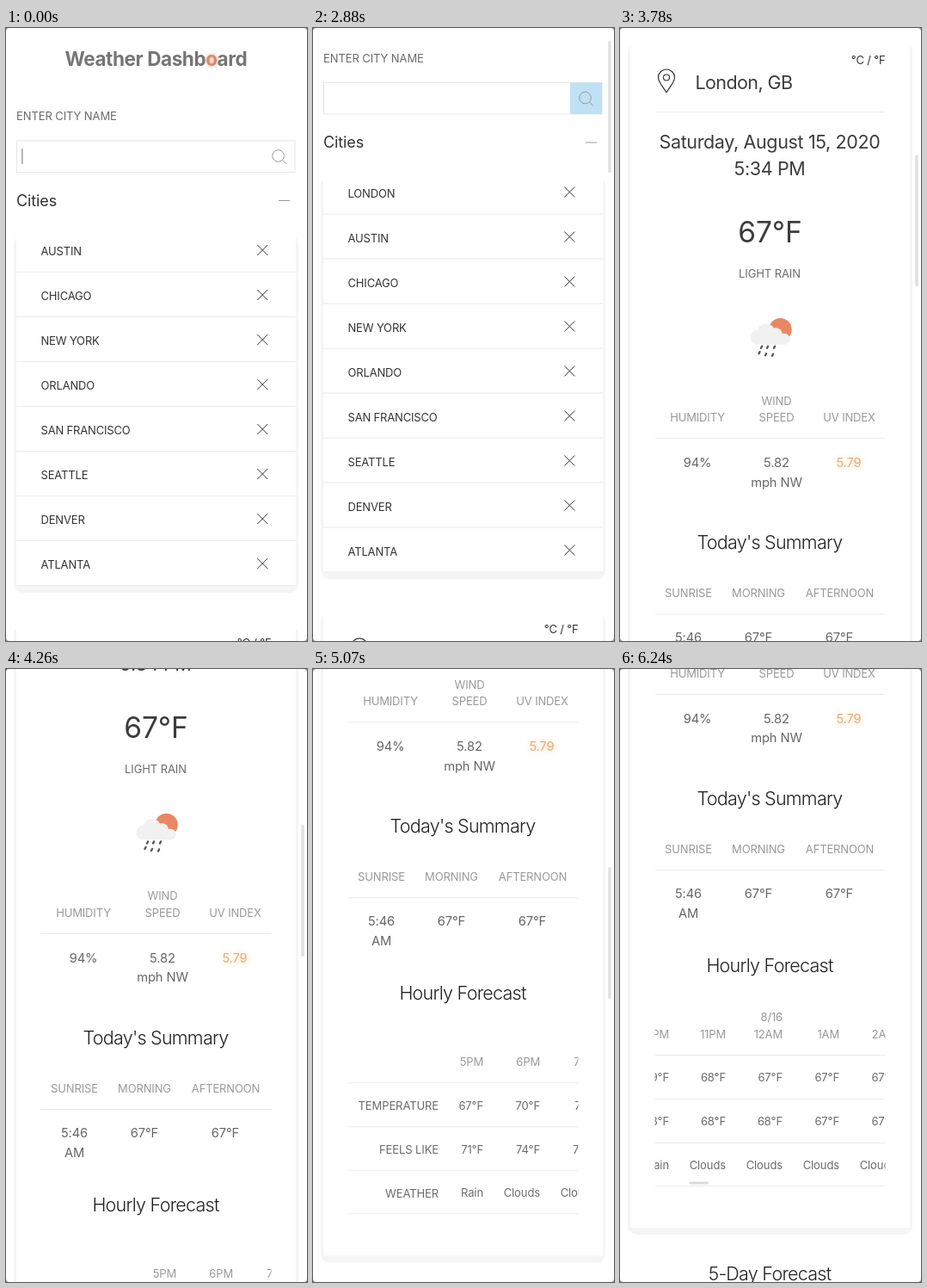
These frames come from a looping animation (350 px wide and 712 px high, 6270 ms). An HTML page with a canvas:

```html
<!DOCTYPE html>
<html lang="en">
<head>
<meta charset="utf-8">
<title>Weather Dashboard</title>
<style>
html, body { margin: 0; width: 100%; height: 100%; overflow: hidden; background: #fff; }
canvas { display: block; width: 350px; height: 712px; }
</style>
</head>
<body>
<canvas id="stage"></canvas>
<script>
const W = 350, H = 712, LOOP = 6270, STEP = 30, ROW = 52;
const canvas = document.getElementById('stage');
const ctx = canvas.getContext('2d');
const dpr = window.devicePixelRatio || 1;
canvas.width = W * dpr;
canvas.height = H * dpr;

const CITIES = ['AUSTIN', 'CHICAGO', 'NEW YORK', 'ORLANDO', 'SAN FRANCISCO', 'SEATTLE', 'DENVER', 'ATLANTA'];
const KEY_TIMES = [480, 600, 780, 960, 1080, 1200];
const SUBMIT = 2700, ADDED = 2730;

// [hour, temperature, feels like, weather]
const HOURS = [
  ['5PM', 67, 71, 'Rain'], ['6PM', 70, 74, 'Clouds'], ['7PM', 71, 74, 'Clouds'],
  ['8PM', 70, 72, 'Clouds'], ['9PM', 70, 70, 'Clouds'], ['10PM', 69, 68, 'Rain'],
  ['11PM', 68, 68, 'Clouds'], ['12AM', 67, 68, 'Clouds', '8/16'],
  ['1AM', 67, 67, 'Clouds'], ['2AM', 67, 67, 'Clouds']
];

const smooth = p => p * p * (3 - 2 * p);
const easeOut = k => p => 1 - Math.pow(1 - p, k);

// [start, end, from, to, easing]
const FLICKS = [
  [2760, 3240, 0, 432, smooth],
  [3570, 4200, 432, 872, easeOut(2.76)],
  [4200, 4740, 872, 999.5, easeOut(1.9)],
  [4830, 5250, 999.5, 1175.5, easeOut(2)]
];
const SWIPES = [[5730, 6240, 0, 457, easeOut(2)]];

function position(moves, t) {
  let value = 0;
  for (const [start, end, from, to, ease] of moves) {
    if (t >= start) value = from + (to - from) * ease(Math.min(1, (t - start) / (end - start)));
  }
  return value;
}

// [weight, size, letter spacing, colour]
const STYLE = {
  title: [700, 22.5, -0.42, '#757575'],
  label: [400, 13, -0.1, '#6b6b6b'],
  city: [400, 13, -0.17, '#333'],
  head: [400, 13, -0.15, '#999'],
  value: [400, 14.7, -0.1, '#666'],
  section: [400, 18, -0.1, '#333'],
  place: [400, 21.5, -0.6, '#3c3c3c'],
  date: [400, 21.5, -0.36, '#3c3c3c'],
  heading: [300, 21.5, -0.74, '#222'],
  temp: [400, 33.5, -0.1, '#3c3c3c']
};

function setStyle(name) {
  const [weight, size, spacing, color] = STYLE[name];
  ctx.font = `${weight} ${size}px Inter, "Open Sans", sans-serif`;
  ctx.letterSpacing = spacing + 'px';
  ctx.fillStyle = color;
  return size;
}

// y is the middle of the capitals
function text(str, x, y, style, align = 'center', color) {
  const size = setStyle(style);
  if (color) ctx.fillStyle = color;
  ctx.textAlign = align;
  ctx.fillText(str, x, y + size * 0.364);
}

function rect(x, y, w, h, color, radius = 0) {
  ctx.fillStyle = color;
  ctx.beginPath();
  ctx.roundRect(x, y, w, h, radius);
  ctx.fill();
}

function stroke(color, width, draw) {
  ctx.strokeStyle = color;
  ctx.lineWidth = width;
  ctx.beginPath();
  draw();
  ctx.stroke();
}

function rule(y, x1 = 41, x2 = 308, color = '#eaeaea') {
  rect(x1, Math.floor(y), x2 - x1, 1, color);
}

function circle(x, y, r, color) {
  ctx.fillStyle = color;
  ctx.beginPath();
  ctx.arc(x, y, r, 0, Math.PI * 2);
  ctx.fill();
}

function card(top, bottom) {
  rect(9, top + 4, 331, bottom - top + 4, '#f5f5f5', 10);
  rect(12, top, 325, bottom - top, '#fff');
}

function title() {
  const parts = ['Weather Dashb', 'o', 'ard'];
  setStyle('title');
  const widths = parts.map(p => ctx.measureText(p).width);
  let x = 174.3 - widths.reduce((a, b) => a + b) / 2;
  parts.forEach((part, i) => {
    ctx.save();
    if (i === 1) {
      ctx.shadowColor = '#f0a080';
      ctx.shadowBlur = 4 * dpr;
    }
    text(part, x, 36.3, 'title', 'left', i === 1 ? '#d58c70' : undefined);
    ctx.restore();
    x += widths[i];
  });
}

function searchField(t) {
  ctx.strokeStyle = '#e6e6e6';
  ctx.lineWidth = 1;
  ctx.strokeRect(12.5, 131, 323.5, 36.5);
  if (t >= SUBMIT) rect(299, 131, 37, 36.5, '#bfe1f4');
  stroke('#999', 1, () => {
    ctx.arc(316.5, 148.5, 6.8, 0, Math.PI * 2);
    ctx.moveTo(321.4, 153.4);
    ctx.lineTo(326, 158);
  });
  if (t >= SUBMIT) return;

  const typed = 'London'.slice(0, KEY_TIMES.filter(k => t >= k).length);
  text(typed, 18.5, 149, 'city', 'left');
  const caretOff = (t >= 180 && t < KEY_TIMES[0]) || (t >= 1650 && t < 2100) || t >= 2550;
  if (!caretOff) rect(18.3 + ctx.measureText(typed).width, 140, 1.2, 18, '#888');
}

function cityList(names) {
  const bottom = 283 + ROW * (names.length - 1);
  card(237, bottom + 1);
  names.forEach((name, i) => {
    const y = 259.4 + ROW * i;
    text(name, 40.5, y, 'city', 'left');
    stroke('#333', 1, () => {
      for (const d of [-6, 6]) {
        ctx.moveTo(298.3 - d, y - 7.4);
        ctx.lineTo(298.3 + d, y + 4.6);
      }
    });
    rule(283 + ROW * i, 12, 337);
  });
}

function pin(x, y) {
  stroke('#333', 1.2, () => {
    ctx.moveTo(x, y + 27);
    ctx.bezierCurveTo(x - 4, y + 20, x - 9.5, y + 15, x - 9.5, y + 9.5);
    ctx.arc(x, y + 9.5, 9.5, Math.PI, 0);
    ctx.bezierCurveTo(x + 9.5, y + 15, x + 4, y + 20, x, y + 27);
    ctx.moveTo(x + 3.5, y + 9.5);
    ctx.arc(x, y + 9.5, 3.5, 0, Math.PI * 2);
  });
}

function rainIcon(x, y) {
  circle(x + 35.5, y + 14, 13.2, '#ea8763');
  const cloud = '#f1f1f1';
  circle(x + 19, y + 17, 10, cloud);
  circle(x + 30, y + 20, 8, cloud);
  circle(x + 9, y + 23, 8.5, cloud);
  circle(x + 40, y + 25, 6.5, cloud);
  rect(x + 8, y + 20, 33, 11.5, cloud, 5);
  ctx.lineCap = 'round';
  stroke('#555', 2.4, () => {
    for (const [dx, dy] of [[14, 33.5], [21, 33.5], [29, 33.5], [11.5, 40], [19, 42], [27, 42.5]]) {
      ctx.moveTo(x + dx, y + dy);
      ctx.lineTo(x + dx - 1, y + dy + 2);
    }
  });
  ctx.lineCap = 'butt';
}

function hourly(shift) {
  ctx.save();
  ctx.beginPath();
  ctx.rect(40.5, 835, 268, 220);
  ctx.clip();
  ['TEMPERATURE', 'FEELS LIKE', 'WEATHER'].forEach((name, i) => {
    text(name, 146 - shift, 922.5 + 51 * i, 'label', 'right');
  });
  let right = 146 - shift;
  for (const [hour, temp, feels, sky, date] of HOURS) {
    right += sky === 'Rain' ? 52 : 66;
    text(hour, right, 872, 'head', 'right');
    if (date) text(date, right, 852, 'head', 'right');
    text(temp + '°F', right, 922.5, 'label', 'right');
    text(feels + '°F', right, 973.5, 'label', 'right');
    text(sky, right, 1024, 'label', 'right');
  }
  ctx.restore();
  [896.5, 947.5, 998, 1048.5].forEach(y => rule(y));
  if (shift > 0) rect(41 + shift * 0.0865, 1043.5, 22.5, 3, '#dcdcdc', 1.5);
}

function weather(shift) {
  card(15, 1097);
  text('°C / °F', 308.5, 38.3, 'city', 'right');
  pin(54, 48.8);
  text('London, GB', 87.5, 64, 'place', 'left');
  rule(98);
  text('Saturday, August 15, 2020', 174, 133.3, 'date');
  text('5:34 PM', 174, 164.3, 'date');
  text('67°F', 174.5, 237.8, 'temp');
  text('LIGHT RAIN', 174, 286.5, 'label');
  rainIcon(151, 337);

  text('HUMIDITY', 90, 453.4, 'head');
  text('WIND', 182, 433.8, 'head');
  text('SPEED', 182, 453.4, 'head');
  text('UV INDEX', 266.5, 453.4, 'head');
  rule(477.5);
  text('94%', 90, 505.3, 'value');
  text('5.82', 182, 505.3, 'value');
  text('mph NW', 182, 528, 'value');
  ctx.save();
  ctx.shadowColor = '#f5c890';
  ctx.shadowBlur = 7 * dpr;
  text('5.79', 266, 505.3, 'value', 'center', '#e2b07c');
  ctx.restore();

  text("Today's Summary", 174, 598, 'heading');
  text('SUNRISE', 79.5, 657.4, 'head');
  text('MORNING', 161, 657.4, 'head');
  text('AFTERNOON', 255.5, 657.4, 'head');
  rule(681.5);
  text('5:46', 79.5, 708.8, 'value');
  text('AM', 79.5, 731.8, 'value');
  text('67°F', 161, 708.8, 'value');
  text('67°F', 255, 708.8, 'value');

  text('Hourly Forecast', 174, 792, 'heading');
  hourly(shift);
  text('5-Day Forecast', 174, 1150, 'heading');
}

function scrollbar(t, scroll) {
  if (t < 2760) return;
  ctx.globalAlpha = t < 5670 ? 1 : t < 5760 ? 0.5 : t < 5790 ? 0.25 : 0;
  rect(343.2, 1.5 + scroll * 0.2, 3.5, 153, '#e0e0e0', 1.75);
  ctx.globalAlpha = 1;
}

function corners() {
  ctx.fillStyle = '#8a8a8a';
  ctx.beginPath();
  ctx.rect(0, 0, W, H);
  ctx.roundRect(0, 0, W, H, 4);
  ctx.fill('evenodd');
}

function draw(t) {
  const scroll = position(FLICKS, t);
  const names = t >= ADDED ? ['LONDON', ...CITIES] : CITIES;
  ctx.setTransform(dpr, 0, 0, dpr, 0, 0);
  rect(0, 0, W, H, '#fff');

  ctx.save();
  ctx.translate(0, -scroll);
  title();
  text('ENTER CITY NAME', 12, 102.5, 'label', 'left');
  searchField(t);
  text('Cities', 12, 200, 'section', 'left');
  rect(317, 200, 13, 1, '#999');
  cityList(names);
  ctx.translate(0, 727.5 + ROW * (names.length - 9));
  weather(position(SWIPES, t));
  ctx.restore();

  scrollbar(t, scroll);
  corners();
}

const origin = performance.now();
function frame() {
  const t = (performance.now() - origin) % LOOP;
  draw(Math.floor(t / STEP) * STEP);
  requestAnimationFrame(frame);
}
frame();
</script>
</body>
</html>
```
